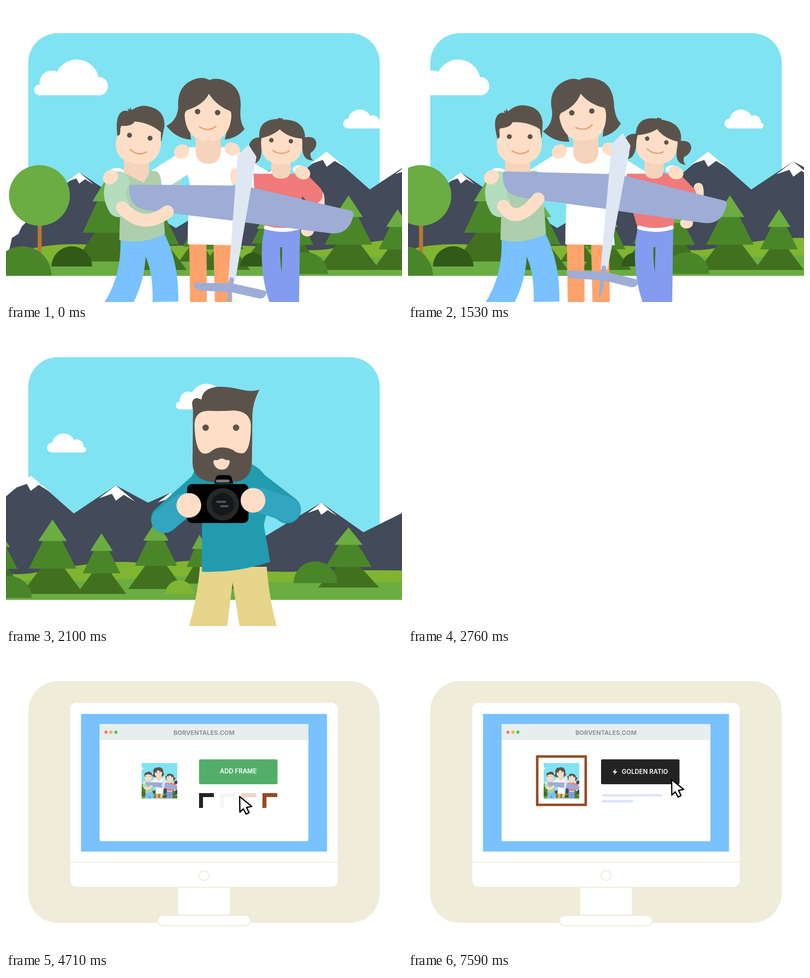
An HTML page that plays this animation: 800x600 px, repeating every 8000 ms.

```html
<!DOCTYPE html>
<html lang="en">
<head>
<meta charset="utf-8">
<title>Picture framing</title>
<style>
html, body { margin: 0; width: 100%; height: 100%; overflow: hidden; background: #fff; }
svg { display: block; }
#stage { width: 100vw; height: 100vh; }
text { font: 600 12.6px Inter, "Open Sans", sans-serif; fill: #fff; text-anchor: middle; }
.hair { fill: #5b534b; }
.skin { fill: #ffdec7; }
.neck { fill: #f6d4bb; }
.smile { fill: none; stroke: #e5a877; stroke-width: 3; stroke-linecap: round; }
.limb { fill: none; stroke-linecap: round; stroke-linejoin: round; }
.teal { fill: #229baf; }
.shirt { fill: #62c5df; }
.wing { fill: #9dadd6; }
.beige { fill: #efecda; }
</style>
</head>
<body>
<svg id="stage" viewBox="0 0 800 600">
<defs>
  <clipPath id="window"><rect x="45" y="55" width="710" height="490" rx="60"/></clipPath>
  <filter id="smear" filterUnits="userSpaceOnUse" x="420" y="150" width="420" height="480" color-interpolation-filters="sRGB">
    <feGaussianBlur id="smearSize" stdDeviation="0 0"/>
  </filter>
  <path id="cloud" fill="#fff" d="M11 71a11 11 0 0 1 0-22A25 25 0 0 1 46 23A45 45 0 0 1 130 34A18.5 18.5 0 0 1 131 71Z"/>
  <path id="snow" fill="#fff" d="M0 0L39 33L16 19L0 31L-8 17L-34 26Z"/>
  <path id="corner" d="M0 0h30v8h-22v22h-8z"/>
</defs>

<g id="outdoors"><g id="scene">
  <g clip-path="url(#window)">
    <rect x="45" y="55" width="710" height="460" fill="#80e3f2"/>
    <g id="sky">
      <use href="#cloud" x="57" y="110"/>
      <use href="#cloud" transform="translate(760 210.500) scale(-.53 .53)"/>
      <use href="#cloud" transform="translate(941 110) scale(.72)"/>
    </g>
  </g>
  <g id="land">
    <path fill="#434a59" d="M7 492L12 470L25 462L32 447L70 408L148 337L194 368L260 400L343 450L440 392L539 330L583 350L648 295L735 372L820 315L885 350L930 330L1010 400L1110 425L1235 350L1320 410L1400 370L1520 440V520H7Z"/>
    <g id="snows"></g>
    <path fill="#80b531" d="M20 500Q90 478 170 484Q260 488 340 486Q450 482 560 490Q610 498 650 493Q770 470 837 470Q870 470 900 480Q960 460 1010 473Q1080 492 1180 490Q1320 484 1520 490V547H20Z"/>
    <path fill="#6bad42" d="M0 522Q60 517 120 518Q300 520 420 510Q560 505 680 508Q800 512 900 498Q1000 500 1100 510Q1300 515 1520 508V547H0Z"/>
    <rect x="64" y="440" width="8" height="60" fill="#b87730"/>
    <circle cx="67.500" cy="384" r="61.500" fill="#6bad42"/>
    <g id="trees"></g>
    <g id="bushes"></g>
  </g>
  <g id="people">
    <g id="mum">
      <path fill="#ffa36c" d="M370 478H405L406 600H372ZM419 478H455L457 600H422Z"/>
      <path fill="#b4dcbf" d="M313 330L348 322Q364 340 350 362Q335 380 313 388Z"/>
      <path class="limb" stroke="#fff" stroke-width="46" d="M376 309L298 358M446 312L550 375"/>
      <path fill="#fff" d="M364 287Q410 284 456 287Q480 292 482 330L456 365L467 485L367 483Q367 420 372 365Q368 335 352 310Z"/>
      <ellipse class="skin" cx="462" cy="345" rx="9" ry="17"/>
      <path class="neck" d="M383 262H434V295Q432 320 409 320Q385 320 383 295Z"/>
    </g>
    <g id="girl">
      <g id="girlArm">
        <path class="limb" stroke="#ffdec7" stroke-width="19" d="M633 384Q640 412 609 456"/>
        <ellipse class="skin" cx="609" cy="456" rx="13" ry="11"/>
      </g>
      <path fill="#849cef" d="M522 452Q560 460 594 452L592 600H532Q512 540 518 475Z"/>
      <path fill="#41711f" d="M554 489H558L557 540Q553 515 554 489Z"/>
      <path fill="#f17a7a" d="M500 340H600L595 450H522L502 380Z"/>
      <path class="limb" stroke="#f17a7a" stroke-width="38" d="M594 354L621 382"/>
      <path class="limb" stroke="#fff" stroke-width="8" d="M525 449Q560 459 591 449"/>
      <path class="neck" d="M536 310H575V335Q573 350 556 350Q538 350 536 335Z"/>
      <ellipse fill="#fff" cx="592" cy="331" rx="13" ry="8"/>
      <ellipse class="skin" cx="599" cy="338" rx="16" ry="13" transform="rotate(20 599 338)"/>
    </g>
    <g id="girlHead">
      <path class="hair" d="M520 266Q495 264 491 283Q490 293 501 298Q508 308 503 319Q518 314 516 285ZM598 268Q624 260 627 278Q627 290 615 298Q614 308 621 313Q601 314 599 292Z"/>
      <path class="hair" d="M515 285Q500 230 549 229Q551 225 555 228Q558 225 559 230Q600 230 604 262Q604 276 598 288Z"/>
      <path class="skin" d="M516 268Q540 262 553 250Q570 267 598 269Q604 319 557 321Q510 319 516 268Z"/>
      <circle class="hair" cx="536" cy="272" r="4.500"/><circle class="hair" cx="575.500" cy="274" r="4.500"/>
      <path class="smile" d="M539 293Q556 304 572 294"/>
    </g>
    <g id="boy">
      <ellipse fill="#fff" cx="224" cy="337" rx="15" ry="9"/>
      <path fill="#79c1ff" d="M231 465L319 460Q350 520 348 599L296 600Q298 545 282 508Q280 555 258 600H199Q235 545 231 465Z"/>
      <path fill="#adcfad" d="M229 474Q230 420 235 350L240 334H300Q313 336 314 360L321 462Q275 485 229 474Z"/>
      <path class="neck" d="M238 310H289V340L278 358L238 338Z"/>
      <path class="limb" stroke="#b4dcbf" stroke-width="44" d="M227 357Q212 378 228 406"/>
      <ellipse class="skin" cx="211" cy="347" rx="16" ry="14" transform="rotate(-40 211 347)"/>
    </g>
    <g id="boyHead">
      <path class="hair" d="M225 262Q219 216 240 212L247 213L246 207L250 211L251 205L254 211Q270 200 286 203Q322 210 320 244L314 274L300 262L226 275Z"/>
      <path class="skin" d="M233 243Q255 244 260 234Q292 237 313 256V282Q308 321 268 321Q222 315 222 282Q222 266 227 262Q231 264 231 248Z"/>
      <circle class="hair" cx="249.500" cy="262" r="5"/><circle class="hair" cx="291" cy="268" r="5"/>
      <path class="smile" d="M251 291Q266 305 284 296"/>
    </g>
    <g id="mumHead">
      <path class="hair" d="M411 150Q394 140 371 153Q345 168 348 205Q346 232 324 243Q344 269 374 271L372 258H445L442 271Q469 267 482 249Q471 235 474 205Q476 165 446 153Q426 144 411 150Z"/>
      <path class="skin" d="M361 224Q360 215 366 211Q398 201 410 178Q425 202 453 213Q456 216 455 228Q449 274 409 274Q365 272 361 224Z"/>
      <circle class="hair" cx="387" cy="214" r="5.500"/><circle class="hair" cx="427.500" cy="216" r="5.500"/>
      <path class="smile" d="M391 245Q409 256 424 244"/>
    </g>
    <ellipse class="skin" cx="355" cy="295" rx="16" ry="14" transform="rotate(-35 355 295)"/>
    <ellipse class="skin" cx="457" cy="290" rx="16" ry="13" transform="rotate(20 457 290)"/>
    <g id="plane">
      <path class="wing" d="M253 362L466 364Q469 364 469 368L462 432Q461 436 457 435L285 414Q247 408 249 367Q249 362 253 362ZM493 367L697 415Q703 417 702 423Q694 463 658 461L485 439Q480 438 481 433L488 371Q489 367 493 367Z"/>
      <path fill="#dfe7f3" d="M490 281L506 306L503 322L463 558H449L468 303Z"/>
      <path class="wing" d="M383 561L456 562L523 577Q527 579 526 583Q522 594 512 593L455 580L395 577Q381 576 380 565Q380 561 383 561Z"/>
      <path class="wing" d="M451 555Q452 549 457 550Q461 552 460 558L455 590Q450 620 446 612Z"/>
    </g>
    <path id="boyArm" class="limb" stroke="#ffdec7" stroke-width="26"/>

    <g transform="translate(523 0)">
      <g id="torso">
        <path fill="#e7d58b" d="M577 480H712Q716 540 732 600H657L643 512L632 600H555Q572 540 577 480Z"/>
        <path id="sleeves" class="limb" stroke="#229baf" stroke-width="56"/>
        <path class="teal" d="M566 285Q620 270 684 273Q715 290 722 330L706 395L719 470Q650 493 581 490V380L540 340Z"/>
      </g>
      <path class="hair" d="M563 165L561 148Q563 137 572 138L580 141Q582 118 613 115Q635 114 661 121Q682 126 697 121Q684 147 683 170L682 268Q680 308 642 308H602Q562 305 562 268Z"/>
      <path class="skin" d="M566 190Q568 161 600 164Q622 165 645 163Q680 165 680 195Q679 245 664 250Q651 250 645 244Q635 238 622 238Q608 238 600 246Q592 252 583 250Q567 245 566 190Z"/>
      <path class="skin" d="M604 268Q604 262 612 264Q621 257 630 264Q638 262 637 268Q634 283 621 283Q608 283 604 268Z"/>
      <circle class="hair" cx="588.500" cy="198" r="6.500"/><circle class="hair" cx="650" cy="198" r="6.500"/>
      <g id="arms">
        <path id="forearms" class="limb" stroke="#32a5c0" stroke-width="50"/>
        <g id="camera">
          <path d="M606 358L609 346Q611 341 617 341H633Q639 341 641 346L644 358Z"/>
          <rect x="551" y="359" width="124" height="79" rx="10"/>
          <rect x="609" y="350" width="28" height="6" rx="3" fill="#777"/>
          <circle cx="623" cy="400" r="33" fill="#252729"/><circle cx="623" cy="400" r="23" fill="#15181a"/>
          <path class="limb" stroke="#555568" stroke-width="4" d="M612 395H628M620 404H633"/>
        </g>
        <circle id="handL" class="skin" r="25"/><circle id="handR" class="skin" r="25"/>
      </g>
    </g>
  </g>
</g></g>

<g id="desk">
  <rect class="beige" x="45" y="55" width="710" height="490" rx="60"/>
  <g id="monitor">
    <rect x="348" y="474" width="104" height="54" fill="#fff"/>
    <rect x="306" y="530" width="188" height="21" rx="10.500" fill="#fff" stroke="#efecda" stroke-width="2"/>
    <rect x="130" y="99" width="540" height="373" rx="12" fill="#fff"/>
    <path stroke="#efecda" stroke-width="2" d="M130 422H670"/>
    <circle cx="400" cy="449" r="10" fill="none" stroke="#efecda" stroke-width="2"/>
    <rect x="151.500" y="121.500" width="497" height="279" fill="#79c1ff"/>
    <rect x="189" y="142" width="422" height="237.500" rx="3" fill="#fff"/>
    <path fill="#e6efee" d="M189 174.500V145q0-3 3-3H608q3 0 3 3V174.500Z"/>
    <circle cx="202" cy="158.500" r="3.200" fill="#ef7a7a"/><circle cx="212" cy="158.500" r="3.200" fill="#f0b34c"/><circle cx="222" cy="158.500" r="3.200" fill="#55bf55"/>
    <text x="400" y="164" style="fill:#83898b;font-size:12.400px">BORVENTALES.COM</text>
    <g id="upload">
      <rect x="320.700" y="249" width="159" height="51" rx="4" fill="#5aa3e6"/>
      <text x="400" y="279.500">UPLOAD PICTURE</text>
    </g>
    <g id="editor">
      <rect id="frame" fill="#fff" stroke="#944a24"/>
      <svg x="274" y="221" width="72" height="72" viewBox="189 91 456 456"><use href="#scene"/></svg>
    </g>
    <g id="choose">
      <rect id="addButton" x="390" y="213.500" width="158.500" height="50.500" rx="3"/>
      <text x="469.300" y="242">ADD FRAME</text>
      <g id="corners"></g>
    </g>
    <g id="golden">
      <rect x="390" y="213.500" width="158.500" height="50.500" rx="3" fill="#232323"/>
      <path fill="#fff" d="M420 233L413 240H417.500L416 245L423 238H418.500Z"/>
      <text x="478.500" y="242.500">GOLDEN RATIO</text>
      <path class="limb" stroke="#dfe7f5" stroke-width="5.500" stroke-linecap="butt" d="M394.500 286.500H511.500M394.500 298.500H452.500"/>
    </g>
    <g id="cursor">
      <path id="rays" class="limb" stroke="#000" stroke-width="2.400"/>
      <path fill="#fff" stroke="#000" stroke-width="2.600" stroke-linejoin="round" d="M1 1.500L1.500 33L8.500 26.500L14 37L20 34L15 23.500L25.500 21.500Z"/>
    </g>
  </g>
  <g id="man">
    <path class="hair" d="M108 250L141 366H262Q284 345 279 318L243 190Z"/>
    <path class="skin" d="M115 261L164 366H250Q264 345 262 295Q258 250 249 224L230 300H150Z"/>
    <path class="hair" d="M112 186Q112 178 122 172Q158 147 205 147Q232 146 243 137Q243 150 239 165Q234 182 243 193L249 224Q254 270 253 310Q252 330 245 332Q210 343 168 349Q161 346 115 261L108 245Z"/>
    <path class="shirt" d="M115 660L116 410V363L150 362Q200 361 250 359Q264 358 274 366L301 400V660Z"/>
    <path id="scratch" class="limb" stroke="#62c5df" stroke-width="50"/>
    <path id="reach" class="limb" stroke="#62c5df" stroke-width="50"/>
  </g>
</g>
<rect id="flash" width="800" height="600" fill="#fff"/>
</svg>

<script>
const $ = id => document.getElementById(id);
const LOOP = 8000;

// scenery: [x, top, height, half width]
const trees = [
  [205, 346, 172, 66], [385, 430, 88, 36], [302, 384, 151, 63], [442, 412, 123, 51],
  [522, 428, 81, 34], [583, 405, 120, 50], [791, 412, 123, 50], [692, 384, 151, 63],
  [1045, 420, 105, 50], [901, 387, 138, 56], [989, 415, 99, 34], [1290, 400, 122, 62]
];
$('trees').innerHTML = trees.map(([x, y, h, w]) => {
  const tier = (a, b, k, c) =>
    `<path fill="${c}" d="M${x} ${y + a * h}L${x + k * w} ${y + b * h}H${x - k * w}Z"/>`;
  return tier(.44, 1, 1, '#41711f') + tier(.03, .66, .76, '#4a8629') + tier(0, .29, .46, '#6bad42');
}).join('');

// [centre, base, radius x, radius y, colour]
$('bushes').innerHTML = [
  [33, 547, 59, 60, '#4a8629'], [133, 528, 41, 41, '#315918'], [499, 528, 26, 28, '#315918'],
  [605.5, 543, 44.5, 44, '#4a8629'], [948.5, 535, 28.5, 28, '#80b531'], [1223, 513, 44, 44, '#4a8629']
].map(([x, y, rx, ry, c]) =>
  `<path fill="${c}" d="M${x - rx} ${y}A${rx} ${ry} 0 0 1 ${x + rx} ${y}Z"/>`).join('');

$('snows').innerHTML = [
  [148, 337, .74], [539, 330, .7], [648, 295, 1], [820, 315, 1], [930, 330, .75], [1235, 350, .8]
].map(([x, y, s]) => `<use href="#snow" transform="translate(${x} ${y}) scale(${s})"/>`).join('');

$('corners').innerHTML = ['#232323', '#f6f6f6', '#eed6c2', '#944a24'].map((c, i) =>
  `<use href="#corner" x="${390 + i * 42.700}" y="282" fill="${c}"/>`).join('');

$('rays').setAttribute('d', [90, 135, 180, 225, 270, 315, 0].map(a => {
  const c = Math.cos(a * Math.PI / 180), s = Math.sin(a * Math.PI / 180);
  return `M${c * 5} ${s * 5 - 2}L${c * 9.5} ${s * 9.5 - 2}`;
}).join(''));

// timing helpers
const clamp = v => Math.max(0, Math.min(1, v));
const mix = (a, b, k) => a + (b - a) * k;
const line = k => k;
const swing = k => (1 - Math.cos(Math.PI * k)) / 2;
const settle = k => 1 - (1 - k) ** 3;
function bezier(a, b, c, d) {
  const at = (p, q, s) => 3 * (1 - s) ** 2 * s * p + 3 * (1 - s) * s * s * q + s ** 3;
  return x => {
    let lo = 0, hi = 1;
    for (let i = 0; i < 24; i++) {
      const m = (lo + hi) / 2;
      if (at(a, c, m) < x) lo = m; else hi = m;
    }
    return at(b, d, hi);
  };
}
const glide = bezier(.2, .315, .27, 1);
const zoomEase = bezier(.3, 0, .1, 1);
const span = (t, from, to, ease = swing) => ease(clamp((t - from) / (to - from)));
const panAt = t => span(t, 1500, 2310, glide);

const move = (id, v) => $(id).setAttribute('transform', v);
const draw = (id, d) => $(id).setAttribute('d', d);
const show = (id, on) => $(id).setAttribute('display', on ? 'inline' : 'none');
const set = (id, attrs) => { for (const k in attrs) $(id).setAttribute(k, attrs[k]); };

function family(t) {
  const done = t >= 2760;
  const p = done ? 1 : span(t, 180, 750);
  const pan = done ? 0 : panAt(t);
  move('sky', `translate(${-619 * pan} 0)`);
  move('land', `translate(${-619 * pan} 0)`);
  move('people', `translate(${-733 * pan} 0)`);
  move('boy', `translate(${7 * p} 0)`);
  move('girl', `translate(${-9 * p} 0)`);
  move('girlArm', `translate(${12 * p} ${-16 * p})`);
  move('boyHead', `translate(${2 * p} 0) rotate(${-8 * p} 270 246)`);
  move('mumHead', `translate(${-2.5 * p} 0) rotate(${-8 * p} 403 246)`);
  move('girlHead', `rotate(${8.5 * p} 556 246)`);
  move('plane', `translate(${-8.5 * p} ${-23.5 * p}) rotate(${.8 * p} 475 400)`);
  draw('boyArm', `M${mix(235, 242, p)} ${mix(409, 406, p)}Q${mix(277, 268, p)} ${mix(455, 446, p)} ${mix(326, 312, p)} ${mix(417, 391, p)}`);
}

function photographer(t) {
  const r = span(t, 1950, 2400);
  const lx = mix(552, 562, r), ly = mix(402, 218, r), rx = mix(685, 682, r), ry = mix(391, 210, r);
  const ey = mix(398, 340, r), fy = mix(375, 332, r);
  draw('sleeves', `M585 312L506 ${ey}M680 308L753 ${fy}`);
  draw('forearms', `M504 ${ey + 3}L${lx - 10} ${ly}M755 ${fy}L${rx + 15} ${ry}`);
  move('camera', `translate(0 ${-185 * r})`);
  set('handL', { cx: lx, cy: ly });
  set('handR', { cx: rx, cy: ry });

  // sideways motion blur that fades as the pan comes to rest
  const blur = Math.min(7, 16 * (1 - panAt(t)));
  const filter = t > 1500 && blur > .1 ? 'url(#smear)' : 'none';
  set('smearSize', { stdDeviation: `${blur} 0` });
  set('torso', { filter });
  set('arms', { filter });
}

function desk(t) {
  const z = span(t, 3800, 4260, zoomEase);
  const k = mix(.75, 1, z);
  move('monitor', `translate(${mix(499.5, 400, z)} ${mix(191.5, 99, z)}) scale(${k}) translate(-400 -99)`);

  const away = span(t, 3800, 4260);
  move('man', `translate(${mix(499.5, 400, away) - 480 * away} ${mix(191.5, 99, away)}) scale(${1 + away / 3}) translate(-499.5 -191.5)`);
  const aim = span(t, 3240, 3690);
  const rub = 5 * Math.sin((t - 3780) / 90) * (1 - span(t, 3690, 3780));
  draw('scratch', `M109 ${225 + rub}C75 ${240 + rub} 45 285 45 325C45 368 80 390 135 387`);
  const hx = mix(395, 415, aim), hy = mix(522, 513, aim);
  draw('reach', `M260 385C305 395 312 440 332 476C350 512 375 519 ${hx} ${hy}`);

  const side = span(t, 5700, 6060), up = span(t, 6150, 6480);
  const x = mix(mix(400, 471, aim), 531.5, side);
  const y = mix(mix(mix(345, 287.5, aim), 292, side), 253, up);
  const tap = 1 - .08 * Math.sin(Math.PI * clamp((t - 7080) / 150));
  move('cursor', `translate(${x} ${y}) scale(${tap})`);
  show('rays', t >= 3720 && t < 3870);

  const framed = t >= 6510;
  const reveal = span(t, 6480, 6570);
  show('upload', t < 4710);
  show('editor', t >= 4710);
  show('choose', t >= 4710 && !framed);
  show('golden', framed);
  set('golden', { opacity: reveal });
  set('addButton', { fill: up > .75 ? '#489b5e' : '#53ae6a' });

  const grow = span(t, 7050, 7590, settle);
  const pad = mix(1.8, 13, grow);
  set('frame', {
    x: 274 - pad, y: 221 - pad - .2 * grow, width: 72 + 2 * pad, height: 72 + 2 * pad,
    'stroke-width': mix(4, 5, grow), opacity: framed ? reveal : 0
  });
}

function render(t) {
  show('outdoors', t < 2760);
  show('desk', t >= 3240);
  family(t);
  if (t < 2760) photographer(t);
  if (t >= 3240) desk(t);
  set('flash', { opacity: t < 3240 ? span(t, 2640, 2760, line) : 1 - span(t, 3210, 3330, line) });
}

const start = performance.now();
function tick() {
  render((performance.now() - start) % LOOP);
  requestAnimationFrame(tick);
}
tick();
</script>
</body>
</html>
```
